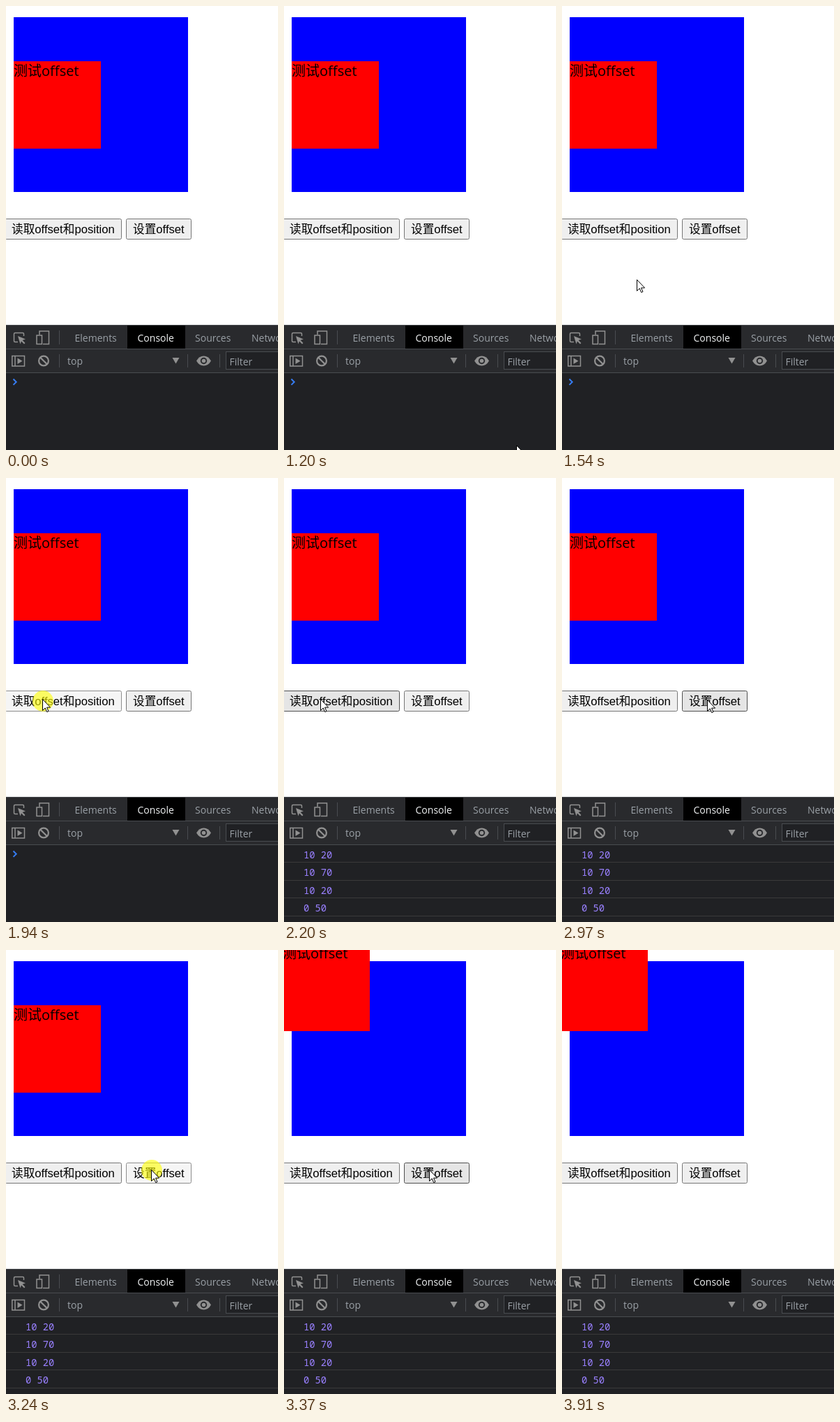
An HTML page that plays this animation: 390x635 px, repeating every 4390 ms.

```html
<!DOCTYPE html>
<html lang="zh-CN">
<head>
<meta charset="utf-8">
<title>offset demo</title>
<style>
html, body { margin: 0; width: 100%; height: 100%; overflow: hidden; background: #fff; }
svg { display: block; }
text { white-space: pre; }
.page { font: 20px "Open Sans", "Noto Sans CJK SC", "Noto Sans CJK", sans-serif; }
.label { font: 16.667px "Liberation Sans", "Noto Sans CJK SC", "Noto Sans CJK", sans-serif; }
.ui { font: 14px "Open Sans", sans-serif; fill: #9aa0a6; }
.log { font: 13.75px "Noto Sans Mono", monospace; fill: #9980ff; }
.line { stroke: #494c50; }
.icon { fill: none; stroke: #919191; stroke-width: 1.5; }
.solid { fill: #919191; }

#cursor, #box, #read, #set, #output, #prompt, .ring {
  animation: 4390ms step-end infinite;
}
#cursor { animation-name: move; }
#box { animation-name: jump; }
#read { animation-name: read; }
#set { animation-name: set; }
#output { animation-name: show; }
#prompt { animation-name: hide; }
#ring1 { animation-name: click1; }
#ring2 { animation-name: click2; }

@keyframes move {
  0%, 89.06% { transform: translate(-60px, -60px); }
  27.33% { transform: translate(333px, 628px); }
  28.92% { transform: translate(311px, 603px); }
  30.52% { transform: translate(267px, 557px); }
  31.89% { transform: translate(212px, 500px); }
  33.48% { transform: translate(154px, 439px); }
  35.07% { transform: translate(107px, 391px); }
  36.67% { transform: translate(76px, 361px); }
  38.26% { transform: translate(60px, 345px); }
  39.63% { transform: translate(56px, 330px); }
  41.23% { transform: translate(53px, 321px); }
  42.82% { transform: translate(52px, 316px); }
  54.66% { transform: translate(56px, 317px); }
  56.26% { transform: translate(75px, 321px); }
  57.85% { transform: translate(109px, 326px); }
  59.45% { transform: translate(148px, 328px); }
  61.04% { transform: translate(175px, 325px); }
  62.87% { transform: translate(190px, 324px); }
  64.46% { transform: translate(198px, 322px); }
  66.05% { transform: translate(203px, 321px); }
  67.65% { transform: translate(208px, 317px); }
  72.2% { transform: translate(208px, 314px); }
  79.72% { transform: translate(208px, 316px); }
  81.32% { transform: translate(209px, 320px); }
  82.68% { transform: translate(212px, 325px); }
  84.28% { transform: translate(222px, 352px); }
  85.87% { transform: translate(245px, 425px); }
  87.47% { transform: translate(273px, 513px); }
}
@keyframes jump {
  0% { transform: none; }
  76.76%, 100% { transform: translate(-13px, -88px); }
}
@keyframes read {
  0%, 59.45%, 100% { fill: #efefef; stroke: #767676; }
  39.63%, 47.38% { fill: #e5e5e5; stroke: #4f4f4f; }
  44.19% { fill: #f5f5f5; stroke: #8d8d8d; }
}
@keyframes set {
  0%, 84.28%, 100% { fill: #efefef; stroke: #767676; }
  62.87%, 76.76% { fill: #e5e5e5; stroke: #4f4f4f; }
  73.8% { fill: #f5f5f5; stroke: #8d8d8d; }
}
@keyframes show {
  0% { visibility: hidden; }
  47.38%, 100% { visibility: visible; }
}
@keyframes hide {
  0% { visibility: visible; }
  47.38%, 100% { visibility: hidden; }
}
@keyframes click1 {
  0%, 47.38%, 100% { visibility: hidden; }
  44.19% { visibility: visible; }
}
@keyframes click2 {
  0%, 76.76%, 100% { visibility: hidden; }
  73.8% { visibility: visible; }
}
</style>
</head>
<body>
<svg width="390" height="635" viewBox="0 0 390 635">
  <rect x="11" y="16" width="250" height="250" fill="#00f"/>
  <g id="box">
    <rect x="11" y="79" width="125" height="125" fill="#f00"/>
    <text class="page" x="11" y="100">测试offset</text>
  </g>

  <rect id="read" x="-1.5" y="304.5" width="167" height="29" rx="2"/>
  <text class="label" x="8" y="325">读取offset和position</text>
  <rect id="set" x="172.5" y="304.5" width="93" height="29" rx="2"/>
  <text class="label" x="182" y="325">设置offset</text>

  <!-- developer tools -->
  <rect y="456" width="390" height="179" fill="#202124"/>
  <rect y="456" width="390" height="69" fill="#292a2d"/>
  <rect x="174" y="457" width="83" height="33" fill="#000"/>
  <path class="line" d="M0 456.5H390M0 490.5H390M0 524.5H390M76.5 464V484M76.5 498V517M260.5 498V517M306.5 498V517"/>
  <g class="ui">
    <text x="98.500" y="480">Elements</text>
    <text x="188.500" y="480" fill="#fff" style="fill:#f1f3f4">Console</text>
    <text x="271" y="480">Sources</text>
    <text x="352" y="480">Network</text>
    <text x="88" y="513">top</text>
  </g>
  <rect class="line" x="315.500" y="494.500" width="90" height="25" fill="#202124"/>
  <text class="ui" x="320.500" y="514">Filter</text>

  <path class="icon" d="M17 480.500H13Q11.500 480.500 11.500 479V469Q11.500 467.500 13 467.500H24Q25.500 467.500 25.500 469V472"/>
  <path class="solid" d="M17 472L28 476.500 23.600 478 27.500 482 26 483.500 22 479.600 20.500 483.500Z"/>
  <path class="icon" d="M48 470V465H61.500V483.500H53M44 471H51.500V483.500H44Z"/>
  <path class="icon" d="M8.800 500.500H26.500V515H8.800ZM13 500.500V515"/>
  <path class="solid" d="M16.500 503.500L23.500 507.800 16.500 512Z"/>
  <g class="icon" style="stroke-width:2.200">
    <circle cx="54" cy="507.500" r="6.900"/>
    <path d="M49.200 502.700L58.800 512.300"/>
  </g>
  <path class="solid" d="M238.500 503H248.500L243.500 511.500Z"/>
  <path class="solid" d="M273 507.500Q277 500.500 283.500 500.500T294 507.500Q290 514.500 283.500 514.500T273 507.500Z"/>
  <circle cx="283.500" cy="507.500" r="4.700" fill="#292a2d"/>
  <circle class="solid" cx="283.500" cy="507.500" r="2.800"/>

  <path id="prompt" d="M10.500 533.500L14.700 537.700 10.500 541.900" fill="none" stroke="#367cf1" stroke-width="2"/>
  <g id="output">
    <path d="M0 549.500H390M0 575.500H390M0 600.500H390M0 626.500H390" stroke="#3a3a3a"/>
    <g class="log">
      <text x="28" y="544">10 20</text>
      <text x="28" y="569">10 70</text>
      <text x="28" y="595">10 20</text>
      <text x="28" y="620">0 50</text>
    </g>
  </g>

  <g fill="#ff0" fill-opacity=".6">
    <circle id="ring1" class="ring" cx="53" cy="319" r="15"/>
    <circle id="ring2" class="ring" cx="209" cy="315" r="15"/>
  </g>
  <path id="cursor" d="M.5 .5V16.500L4.200 12.900 6.700 18.600 9 17.600 6.500 12.100H11.600Z" fill="#fff" stroke="#000"/>
</svg>
</body>
</html>
```
